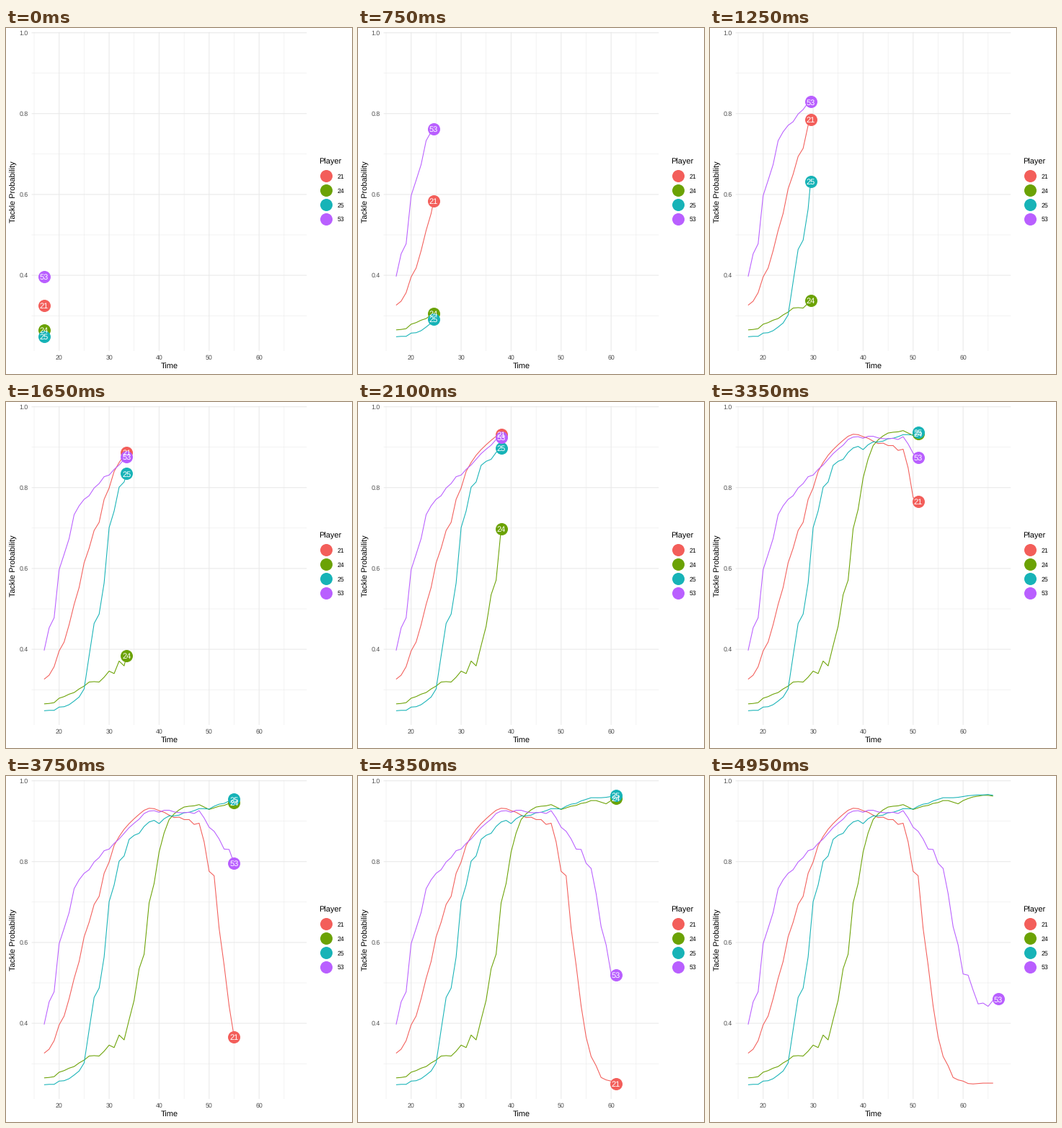
Animation of 480 by 480 pixels, one loop 5 s. Source, as a matplotlib script:

```python
import numpy as np
import matplotlib.pyplot as plt
from matplotlib.animation import FuncAnimation

SIZE = 480
DPI = 100
PT = 72 / DPI  # points per pixel
FRAMES = 100
INTERVAL = 50
START, END = 17, 67

plt.rcParams["font.family"] = "Liberation Sans"
plt.rcParams["text.hinting"] = "none"

LEFT, RIGHT, TOP, BOTTOM = 35.6, 417.1, 5.5, 448.0
DOT = 17

# Tackle probability in thousandths, one value per time step from START.
P21 = [326, 336, 357, 396, 418, 461, 511, 553, 614, 650,
       694, 714, 771, 799, 840, 862, 880, 894, 906, 917,
       927, 932, 931, 926, 922, 915, 909, 910, 904, 904,
       892, 895, 849, 776, 765, 635, 544, 443, 366, 318,
       295, 266, 260, 257, 251, 250, 251, 252, 252, 252]
P24 = [265, 266, 268, 279, 283, 289, 293, 302, 309, 319,
       320, 319, 331, 346, 340, 371, 359, 409, 457, 535,
       571, 698, 746, 824, 871, 904, 918, 928, 935, 937,
       938, 941, 935, 929, 933, 937, 939, 944, 946, 951,
       951, 947, 943, 951, 956, 960, 962, 964, 964, 962]
P25 = [248, 249, 249, 257, 258, 263, 272, 282, 302, 384,
       464, 487, 564, 701, 742, 801, 814, 855, 865, 870,
       887, 898, 902, 894, 906, 913, 913, 915, 921, 922,
       926, 931, 931, 930, 937, 942, 944, 950, 954, 958,
       958, 958, 959, 961, 963, 964, 965, 965, 966, 964]
P53 = [397, 453, 478, 597, 635, 674, 733, 755, 771, 780,
       799, 810, 827, 831, 845, 856, 870, 884, 895, 905,
       919, 925, 926, 922, 927, 927, 923, 921, 921, 922,
       919, 926, 908, 885, 875, 856, 831, 830, 796, 783,
       721, 639, 594, 522, 519, 482, 448, 450, 442, 457, 460]

PLAYERS = [
    ("21", "#F35E5A", P21),
    ("24", "#6BA204", P24),
    ("25", "#17B3B7", P25),
    ("53", "#B95FFF", P53),
]


def to_x(time):
    return 73.7 + (np.asarray(time) - 20) * 6.936


def to_y(prob):
    return 6.6 + (1 - np.asarray(prob)) * 560.8


fig = plt.figure(figsize=(SIZE / DPI, SIZE / DPI), dpi=DPI, facecolor="white")
ax = fig.add_axes([0, 0, 1, 1])
ax.set_xlim(0, SIZE)
ax.set_ylim(SIZE, 0)
ax.axis("off")


def label(x, y, text, size, color="black", **kw):
    return ax.text(x, y, text, fontsize=size * PT, color=color,
                   va="baseline", **kw)


def stroke(xs, ys, color, width, z):
    line, = ax.plot(xs, ys, color=color, lw=width * PT, zorder=z, snap=False,
                    solid_capstyle="butt", solid_joinstyle="round")
    return line


def dot(x, y, color):
    mark, = ax.plot([x], [y], "o", ms=DOT * PT, color=color, mew=0,
                    zorder=4, snap=False)
    return mark


def draw_grid(times, probs, width, z):
    for t in times:
        stroke([to_x(t)] * 2, [TOP, BOTTOM], "#E9E9E9", width, z)
    for p in probs:
        stroke([LEFT, RIGHT], [to_y(p)] * 2, "#E9E9E9", width, z)


def draw_axes():
    major_t, major_p = (20, 30, 40, 50, 60), (0.4, 0.6, 0.8, 1.0)
    draw_grid(range(15, 66, 10), (0.3, 0.5, 0.7, 0.9), 0.53, 1)
    draw_grid(major_t, major_p, 1.07, 2)
    for t in major_t:
        label(to_x(t), 460.2, str(t), 8.8, "#4D4D4D", ha="center")
    for p in major_p:
        label(31, to_y(p) + 3.3, f"{p:.1f}", 8.8, "#4D4D4D", ha="right")
    label(226.4, 473, "Time", 11, ha="center")
    ax.text(13.4, 227, "Tackle Probability", fontsize=11 * PT, rotation=90,
            rotation_mode="anchor", ha="center", va="baseline")


def draw_legend():
    label(433.7, 189, "Player", 11)
    for i, (name, color, _) in enumerate(PLAYERS):
        y = 205.3 + 19.85 * i
        dot(444, y, color)
        label(459.2, y + 3.5, name, 8.8)


class Track:
    """One player's growing line with its numbered dot."""

    def __init__(self, name, color, values):
        self.probs = np.array(values) / 1000
        self.times = START + np.arange(len(values))
        self.line = stroke([], [], color, 1.07, 3)
        self.mark = dot(0, 0, color)
        self.text = label(0, 0, name, 11, "white", ha="center", zorder=5)

    def show(self, now):
        alive = now <= self.times[-1]
        tip = min(now, self.times[-1])
        past = self.times < tip
        times = np.append(self.times[past], tip)
        probs = np.append(self.probs[past],
                          np.interp(tip, self.times, self.probs))
        xs, ys = to_x(times), to_y(probs)
        self.line.set_data(xs, ys)
        self.mark.set_data([xs[-1]], [ys[-1]])
        self.text.set_position((xs[-1], ys[-1] + 4))
        self.mark.set_visible(alive)
        self.text.set_visible(alive)
        return self.line, self.mark, self.text


draw_axes()
draw_legend()
tracks = [Track(*player) for player in PLAYERS]

# Each time step falls on a whole frame; time runs evenly between them.
steps = np.arange(END - START + 1)
step_frames = np.round(steps * (FRAMES - 1) / (END - START))


def update(frame):
    now = np.interp(frame, step_frames, START + steps)
    return [artist for track in tracks for artist in track.show(now)]


anim = FuncAnimation(fig, update, frames=FRAMES, interval=INTERVAL,
                     init_func=lambda: update(0), repeat=True,
                     repeat_delay=0, blit=False)
plt.show()
```
